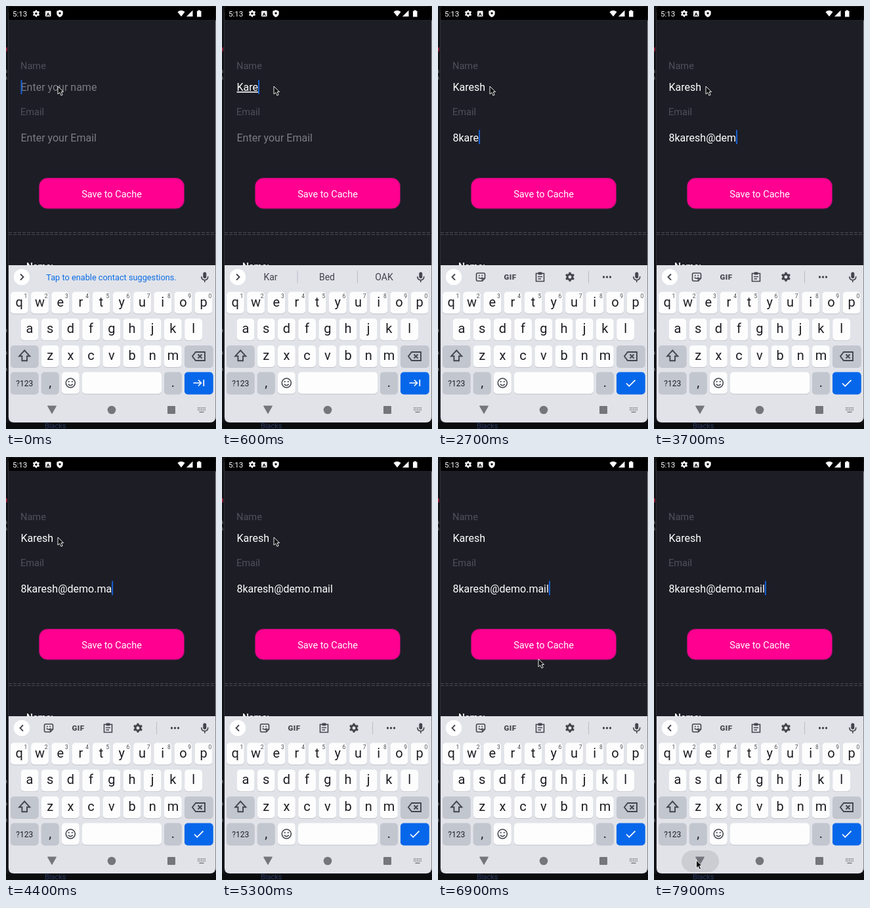
An HTML page for the animation above (8000 ms loop, 320 px wide and 643 px high).

```html
<!DOCTYPE html>
<html lang="en">
<head>
<meta charset="utf-8">
<title>Cache form</title>
<style>
html, body { margin: 0; width: 100%; height: 100%; overflow: hidden; background: #121317; }
svg { display: block; width: 100vw; height: 100vh; font-family: Roboto, "Open Sans", sans-serif; }
.mid { text-anchor: middle; }
.line { fill: none; stroke: #43464d; stroke-width: 1.6; }
.bold { stroke-width: 1.9; }
</style>
</head>
<body>
<svg id="stage" viewBox="0 0 320 643">
  <defs>
    <path id="gear" d="M-1.3-6.5h2.6l.4 1.8 1.4.8 1.8-.6 1.3 2.2-1.4 1.3v1.7l1.4 1.3-1.3 2.2-1.8-.6-1.4.8-.4 1.8h-2.6l-.4-1.8-1.4-.8-1.8.6-1.3-2.2 1.4-1.3v-1.7l-1.4-1.3 1.3-2.2 1.8.6 1.4-.8zM0-2.2a2.2 2.2 0 1 0 0 4.4 2.2 2.2 0 1 0 0-4.4z" fill-rule="evenodd"/>
  </defs>

  <!-- desktop behind the phone -->
  <rect width="320" height="643" fill="#121317"/>
  <rect y="633" width="320" height="10" fill="#0a0c0e"/>
  <rect y="63" width="2" height="6" fill="#8a2038"/>
  <g id="edge" fill="#8d9096" font-size="9"></g>
  <text x="59" y="642" font-size="11" fill="#2b3a63">Blacks</text>

  <!-- app -->
  <rect x="3.5" y="1" width="315.5" height="632" rx="8" fill="#1d1d26" stroke="#303138"/>
  <path d="M4 21V5q0-4 5-4h305q5 0 5 4v16z" fill="#000"/>
  <g fill="#fff">
    <text x="10" y="16" font-size="11.6">5:13</text>
    <use href="#gear" transform="translate(46 11.5) scale(.82)"/>
    <rect x="60" y="7.5" width="8.5" height="8.5" rx="1"/>
    <path d="M82 6l4.7 1.8v3.4q0 3.8-4.7 5.8-4.7-2-4.7-5.8V7.8z"/>
    <path d="M261.5 9q5.5-4.6 11 0l-5.5 7z"/>
    <path d="M284.5 6.5v9.500h-9.500z"/>
    <path d="M291 7.500h2v-1.300h2.500v1.300h2v9h-6.500z"/>
  </g>
  <text x="64.200" y="14.700" class="mid" font-size="8" font-weight="700">A</text>
  <circle cx="82" cy="11" r="1.700"/>

  <g fill="#504f5b" font-size="14.6">
    <text x="22" y="96">Name</text>
    <text x="22" y="166">Email</text>
  </g>
  <g font-size="16">
    <text id="name" x="22.500" y="129"></text>
    <text id="mail" x="22.500" y="205.700"></text>
  </g>
  <rect id="caret" width="2" height="21.500" fill="#1660d2"/>
  <rect x="50.500" y="261.500" width="221" height="46.500" rx="12.500" fill="#ff0090" stroke="#8d1460"/>
  <text x="161" y="291" class="mid" font-size="14.5" fill="#fff">Save to Cache</text>
  <path d="M4 344.500H319M4 347.500H319" stroke="#484850" stroke-dasharray="5 2"/>
  <text x="31" y="401" font-size="14" font-weight="500" fill="#fff">Name:</text>

  <!-- keyboard -->
  <path d="M4 394H319V625q0 8-8 8H12q-8 0-8-8z" fill="#e1e3e9"/>
  <path d="M319.500 22V628" stroke="#85868b"/>
  <circle cx="24" cy="412" r="12.200" fill="#fff"/>
  <path id="chevron" class="line bold"/>
  <rect x="300.300" y="404.500" width="5" height="9.500" rx="2.500" fill="#43464d"/>
  <path class="line" d="M297.800 411q0 5.500 5 5.500t5-5.500M302.800 416.500v3.500"/>
  <text id="hint" x="160.500" y="416.800" class="mid" font-size="12.750" fill="#0b6ce4">Tap to enable contact suggestions.</text>
  <g id="words" class="mid" font-size="14" fill="#40434a">
    <text x="74" y="417">Kar</text>
    <text x="160" y="417">Bed</text>
    <text x="247" y="417">OAK</text>
    <path d="M115 402.500v19M206.500 402.500v19" stroke="#b9bcc3"/>
  </g>
  <g id="tools" fill="#43464d">
    <path class="line" d="M60.500 406h9q2 0 2 2v6l-4 4h-7q-2 0-2-2v-8q0-2 2-2zM71.500 414h-4v4M61.800 412.500q3.200 3.500 6 0"/>
    <circle cx="62.800" cy="409.800" r="1"/><circle cx="67.200" cy="409.800" r="1"/>
    <text x="110" y="416" class="mid" font-size="11.500" font-weight="900" letter-spacing=".5">GIF</text>
    <path class="line" d="M149.500 406.500h12v12h-12zM152 411.500h7M152.500 414.800h4.500"/>
    <rect x="152.500" y="404.500" width="6" height="4" rx="1"/>
    <use href="#gear" transform="translate(201 412) scale(1.1)"/>
    <path d="M229.500 402.500v19" stroke="#b9bcc3"/>
    <circle cx="252.500" cy="412" r="1.700"/><circle cx="257.500" cy="412" r="1.700"/><circle cx="262.500" cy="412" r="1.700"/>
  </g>
  <g id="keys" class="mid" fill="#1d1e22"></g>
  <path class="line bold" d="M28.200 523.500l8 8.700h-4.200v7h-7.600v-7h-4.200z"/>
  <path class="line bold" d="M289 526h14v13h-14l-5-6.500zM292.500 529.500l6 6M298.500 529.500l-6 6"/>
  <circle class="line" cx="98.300" cy="573" r="7"/>
  <circle cx="95.800" cy="571" r="1.100" fill="#43464d"/><circle cx="100.800" cy="571" r="1.100" fill="#43464d"/>
  <path class="line" d="M94.800 574.800q3.500 4 7 0"/>
  <path id="enter" fill="none" stroke="#fff" stroke-width="1.700"/>

  <!-- navigation bar -->
  <rect id="ripple" x="42" y="598" width="57" height="33" rx="16.500" fill="#cbcdd2"/>
  <g fill="#75767c">
    <path d="M63.500 608h13l-6.500 11.500z" stroke="#75767c" stroke-linejoin="round"/>
    <circle cx="161" cy="614" r="6.300"/>
    <rect x="246" y="608" width="12" height="12" rx="1"/>
    <path d="M292 611H304M292 614H304" stroke="#75767c" stroke-width="1.600" stroke-dasharray="1.600 1"/>
    <path d="M294.500 617.300h7" stroke="#75767c" stroke-width="1.400"/>
  </g>
  <path id="mouse" d="M0 0V12L2.800 9.400 5 14 7.200 13 5.100 8.500H8.600z" fill="#0b0b0e" stroke="#fff" stroke-width=".9"/>
</svg>
<script>
const LOOP = 8000, STEP = 100;
const NAME = "Karesh", MAIL = "8karesh@demo.mail";
const NAME_STEP = 150, MAIL_START = 2040, MAIL_STEP = 165;
const FOCUS_MAIL = 1300, RIPPLE = 7900;
const MAIL_END = MAIL_START + (MAIL.length - 1) * MAIL_STEP;
const PITCH = 31.2, WHITE = "#fdfdfe", GREY = "#c2c6cf", BLUE = "#0767ea";

const $ = id => document.getElementById(id);

function add(parent, tag, attrs, text) {
  const node = document.createElementNS("http://www.w3.org/2000/svg", tag);
  set(node, attrs);
  if (text) node.textContent = text;
  parent.append(node);
}

function set(node, attrs) {
  for (const k in attrs) node.setAttribute(k, attrs[k]);
}

function key(x, y, width, fill, label, size = 20, base = 22) {
  const box = { x, width, height: 33, rx: 5 };
  add($("keys"), "rect", { ...box, y: y + 0.9, fill: fill === BLUE ? BLUE : "#bfc2c9" });
  add($("keys"), "rect", { ...box, y, fill });
  if (label) add($("keys"), "text", { x: x + width / 2, y: y + base, "font-size": size }, label);
}

function letters(row, center, y) {
  [...row].forEach((c, i) => key(center + i * PITCH - 13.4, y, 26.8, WHITE, c));
}

function buildKeys() {
  letters("qwertyuiop", 20.3, 434.5);
  letters("asdfghjkl", 36, 475.2);
  letters("zxcvbnm", 67.2, 516);
  for (let i = 0; i < 10; i++) {
    add($("keys"), "text", { x: 30 + i * PITCH, y: 444, "font-size": 8.5, fill: "#4a4c52" }, String((i + 1) % 10));
  }
  key(7, 516, 42.5, GREY);
  key(272, 516, 43.5, GREY);
  key(7, 556.5, 42.5, GREY, "?123", 12, 21);
  key(53.8, 556.5, 26.8, GREY, ",");
  key(85, 556.5, 26.8, WHITE);
  key(116, 556.5, 121, WHITE);
  key(241, 556.5, 26.8, GREY, ".");
  key(272, 556.5, 43.5, BLUE);
}

function show(id, on) {
  $(id).style.display = on ? "" : "none";
}

function typed(text, start, step, t) {
  return text.slice(0, Math.max(0, Math.floor((t - start) / step) + 1));
}

function field(id, text, hint) {
  set($(id), { fill: text ? "#fff" : "#7b7b81" });
  $(id).textContent = text || hint;
  return text ? 22.5 + $(id).getComputedTextLength() : 22.5;
}

function ease(t, from, to) {
  const p = Math.min(1, Math.max(0, (t - from) / (to - from)));
  return p * p * (3 - 2 * p);
}

function draw(t) {
  const name = typed(NAME, NAME_STEP, NAME_STEP, t);
  const mail = typed(MAIL, MAIL_START, MAIL_STEP, t);
  const onMail = t >= FOCUS_MAIL;

  const nameEnd = field("name", name, "Enter your name");
  const mailEnd = field("mail", mail, "Enter your Email");
  $("name").style.textDecoration = name && !onMail ? "underline" : "none";

  const typing = t >= MAIL_START && t < MAIL_END;
  const blinkFrom = t < MAIL_START ? FOCUS_MAIL : MAIL_END;
  show("caret", !onMail || typing || (t - blinkFrom) % 1000 < 500);
  set($("caret"), onMail ? { x: mailEnd, y: 188.5 } : { x: nameEnd, y: 112.5 });

  show("hint", !name);
  show("words", name && !onMail);
  show("tools", onMail);
  set($("chevron"), { d: onMail ? "M26 407.5l-4.500 4.500 4.500 4.500" : "M22 407.5l4.500 4.500-4.500 4.500" });
  set($("enter"), { d: onMail ? "M287 573.500l4.300 4.300 9.200-9.200" : "M285.500 573h12M293 568.500l4.500 4.500-4.500 4.500M301.300 568v10" });

  // pointer: name field, then the button, then the back arrow
  const a = ease(t, 5400, 6300), b = ease(t, 7000, 7700);
  const x = 79 + a * 74 - b * 88.5;
  const y = 122 + a * 185 + b * 306;
  set($("mouse"), { transform: `translate(${x} ${y})` });
  show("ripple", t >= RIPPLE);
}

for (const y of [102, 112, 496, 530, 555]) add($("edge"), "text", { x: -3, y }, "n");
buildKeys();

function tick(now) {
  draw(Math.floor(now % LOOP / STEP) * STEP);
  requestAnimationFrame(tick);
}
draw(0);
requestAnimationFrame(tick);
</script>
</body>
</html>
```
